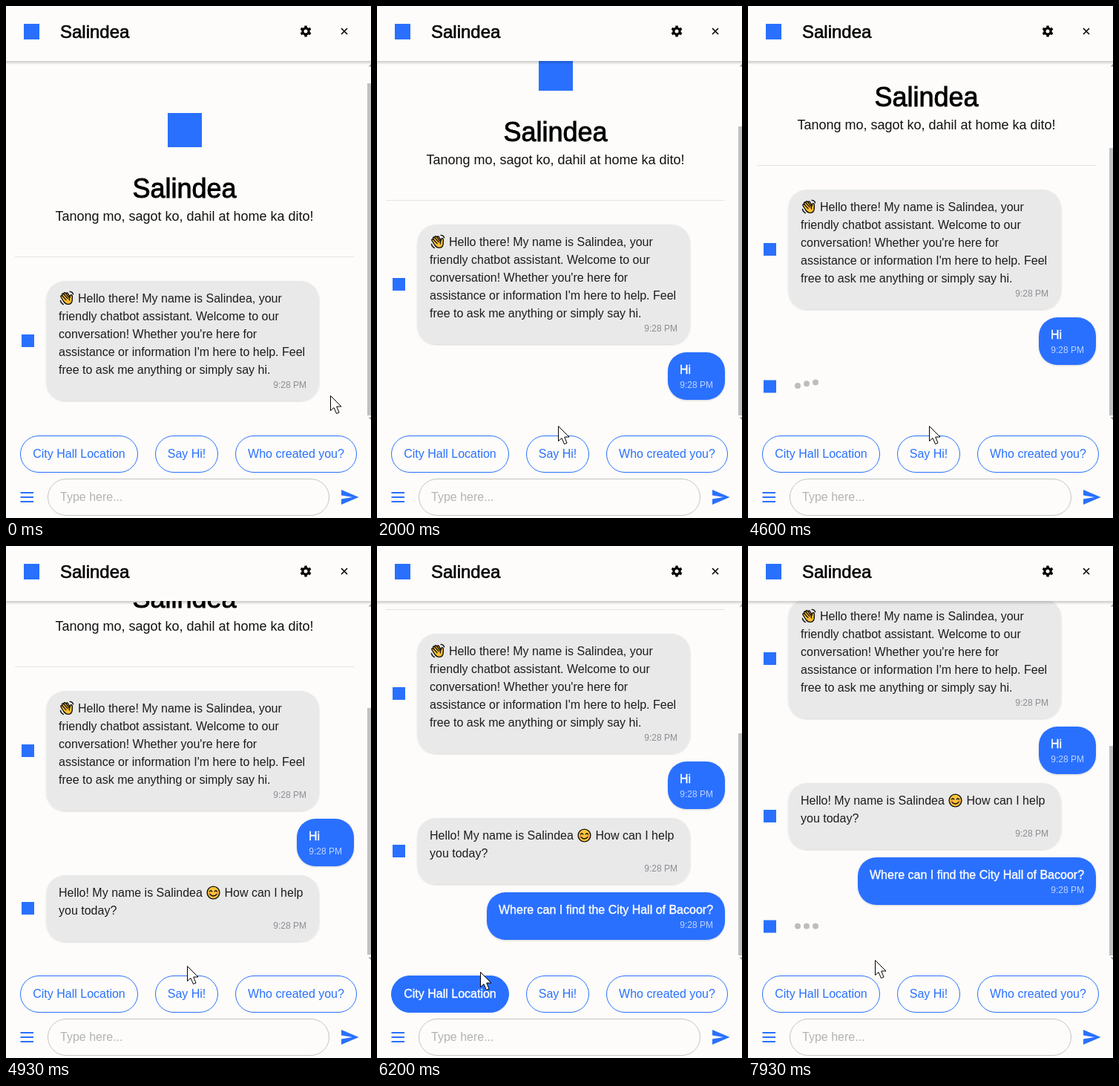
Animation, 492 px wide and 689 px high, one loop 8 s. Source, as an HTML page:

```html
<!DOCTYPE html>
<html lang="en">
<head>
<meta charset="utf-8">
<title>Chat assistant</title>
<style>
html, body { margin: 0; width: 100%; height: 100%; overflow: hidden; background: #fdfcfa; }
svg { display: block; width: 492px; height: 689px; font: 16px "Liberation Sans", Arial, sans-serif; }
.bold { stroke: currentColor; stroke-width: .35; }
.time { font-size: 12px; text-anchor: end; }
.mid { text-anchor: middle; }
.chip rect { fill: #fdfcfa; stroke: #2970ff; }
.chip text { fill: #2970ff; }
.chip.on rect { fill: #2970ff; }
.chip.on text { fill: #fff; stroke: #fff; stroke-width: .35; }
</style>
</head>
<body>
<svg viewBox="0 0 492 689">
  <defs>
    <clipPath id="view"><rect y="74" width="492" height="488"/></clipPath>
    <linearGradient id="shade" x2="0" y2="1">
      <stop stop-color="#000" stop-opacity=".2"/>
      <stop offset="1" stop-color="#000" stop-opacity="0"/>
    </linearGradient>
    <filter id="soft" x="-5%" y="-10%" width="110%" height="125%">
      <feDropShadow dx="0" dy="1" stdDeviation=".9" flood-opacity=".16"/>
    </filter>
    <g id="wave" stroke="#111" stroke-width="1.4" stroke-linejoin="round" stroke-linecap="round">
      <path fill="#ffbf2e" d="M2 8.5Q1.4 6.8 3 6.6L4 7Q2.8 4.6 4.6 4L6 4.8Q5.6 2.7 7.4 2.6L9 4.2Q9.6 2.4 11 3.2L14.2 8.6Q14.4 5.6 16 5.6 17.6 6 17.4 9.4L17.2 13.4Q16.4 18.4 11.8 18.4 8.4 18.2 6 15Z"/>
      <path fill="none" d="M4 7L9 12.6M6 4.8L11 10.6M9 4.2L12.4 9M14.2 8.6Q12.4 11 13.6 13M14 1.4Q17.6 1.6 18.6 4.8M1.4 13.4Q2.2 17.4 5.4 18.6"/>
    </g>
    <g id="smile" stroke="#111" stroke-width="1.4" stroke-linecap="round">
      <circle r="8.4" fill="#ffc53a"/>
      <g fill="#f08a4b" stroke="none"><circle cx="-5" cy="1.6" r="1.8"/><circle cx="5" cy="1.6" r="1.8"/></g>
      <path fill="none" d="M-5-1.6Q-3.4-4-1.8-1.6M1.8-1.6Q3.4-4 5-1.6M-4.2 2.6Q0 6.6 4.2 2.6"/>
    </g>
  </defs>

  <rect width="492" height="689" fill="#fdfcfa"/>
  <g clip-path="url(#view)">
    <g id="list">
      <rect x="218" y="144" width="46" height="46" fill="#2970ff"/>
      <text class="mid bold" x="240.5" y="258" font-size="36" style="stroke-width:.9">Salindea</text>
      <text class="mid" x="240.5" y="289" font-size="18" fill="#111">Tanong mo, sagot ko, dahil at home ka dito!</text>
      <path d="M12 337.5H469" stroke="#e4e4e7"/>
    </g>
    <path d="M488.5 81.5L492 78V81.5ZM488.5 553.5L492 557V553.5Z" fill="#a0a0a0"/>
    <rect id="thumb" x="487" width="5" fill="#c1c1c1"/>
  </g>

  <rect y="74" width="492" height="5" fill="url(#shade)"/>
  <rect width="492" height="74" fill="#fdfcfa"/>
  <rect x="24" y="24" width="21" height="21" fill="#2970ff"/>
  <text class="bold" x="73" y="43" font-size="24" style="stroke-width:.6">Salindea</text>
  <g transform="translate(404 34)">
    <circle r="4.1" fill="none" stroke="#000" stroke-width="3.2"/>
    <g id="teeth" stroke="#000" stroke-width="3.4"></g>
  </g>
  <path d="M452 30L460 38M460 30L452 38" stroke="#000" stroke-width="1.6"/>

  <g id="chips"></g>
  <path d="M19.500 655H37M19.500 661H37M19.500 667H37" stroke="#2970ff" stroke-width="2"/>
  <rect x="56.500" y="636.500" width="379" height="49" rx="24.500" fill="#fdfcfa" stroke="#c4c4c4"/>
  <text x="73" y="666" fill="#b3b3b3">Type here...</text>
  <path d="M452 651L475.500 661 452 671V663.500L467 661 452 658.500Z" fill="#2970ff"/>

  <g id="pointer" fill="#fff" stroke="#000" stroke-linejoin="round">
    <path id="arrow" d="M.5.5V20.500L5 16.500 8.500 24.500 12 23 8.700 15H15Z"/>
    <path id="hand" stroke-width="1.300" d="M0 2Q0-.5 2-.5T4 2V10Q7 8.500 8 11 10.500 9.800 11.500 12 14.500 11.500 14.500 14.500V19Q14 22 12 24.500V28.500H1.500V25.500Q-2.500 21.500-5-16.500
      M0 0"/>
  </g>
</svg>
<script>
const NS = 'http://www.w3.org/2000/svg', LOOP = 8000;
const BLUE = '#2970ff';
const $ = id => document.getElementById(id);

function add(parent, tag, attrs, text) {
  const el = document.createElementNS(NS, tag);
  for (const k in attrs) el.setAttribute(k, attrs[k]);
  if (text) el.textContent = text;
  return parent.appendChild(el);
}
const group = () => add($('list'), 'g', {});

function bubble(g, x, y, right, h, fill) {
  add(g, 'rect', { x, y, width: right - x, height: h, rx: 25, fill, filter: 'url(#soft)' });
}
function avatar(g, y) {
  add(g, 'rect', { x: 21, y: y - 8.5, width: 17, height: 17, fill: BLUE });
}
function botMessage(y, h, lines) {
  const g = group();
  avatar(g, y + h / 2);
  bubble(g, 54.5, y, 422, h, '#e9e9e9');
  for (const [x, row, text] of lines) add(g, 'text', { x, y: y + 29 + row * 24, fill: '#1c1c1c' }, text);
  add(g, 'text', { class: 'time', x: 405, y: y + h - 17, fill: '#8d8d95' }, '9:28 PM');
  return g;
}
function userMessage(x, y, text) {
  const g = group();
  bubble(g, x, y, 469, 64, BLUE);
  add(g, 'text', { class: 'bold', x: x + 16, y: y + 29, fill: '#fff', color: '#fff' }, text);
  add(g, 'text', { class: 'time', x: 453, y: y + 48, fill: '#bdd3ff' }, '9:28 PM');
  return g;
}
function typing(y) {
  const g = group();
  avatar(g, y);
  g.dots = [67, 79, 91].map(cx => add(g, 'circle', { cx, cy: y - .5, r: 4, fill: '#bdbdbd' }));
  return g;
}

const hello = botMessage(370, 161, [
  [97, 0, 'Hello there! My name is Salindea, your'],
  [71, 1, 'friendly chatbot assistant. Welcome to our'],
  [71, 2, "conversation! Whether you're here for"],
  [71, 3, "assistance or information I'm here to help. Feel"],
  [71, 4, 'free to ask me anything or simply say hi.']
]);
add(hello, 'use', { href: '#wave', x: 72, y: 383 });
const reply = botMessage(618, 89, [
  [71, 0, 'Hello! My name is Salindea'],
  [294.5, 0, 'How can I help'],
  [71, 1, 'you today?']
]);
add(reply, 'use', { href: '#smile', x: 279.5, y: 641.5 });

// [element, shown from, shown until]
const items = [
  [userMessage(392, 542, 'Hi'), 1518, LOOP],
  [typing(635), 3110, 4820],
  [reply, 4820, LOOP],
  [userMessage(148, 718, 'Where can I find the City Hall of Bacoor?'), 6040, LOOP],
  [typing(811), 7780, LOOP]
];

function chip(x, width, label, from, to) {
  const el = add($('chips'), 'g', { class: 'chip' });
  add(el, 'rect', { x: x + .5, y: 578.5, width: width - 1, height: 49, rx: 24.5 });
  add(el, 'text', { class: 'mid', x: x + width / 2, y: 608 }, label);
  return { el, from, to };
}
const chips = [
  chip(19, 159, 'City Hall Location', 5640, 6235),
  chip(201, 85, 'Say Hi!', 1180, 1640),
  chip(309, 164, 'Who created you?', -1, -1)
];

for (let a = 0; a < 360; a += 60) add($('teeth'), 'path', { d: 'M0-4V-7.500', transform: `rotate(${a})` });
$('hand').setAttribute('d', 'M0 2Q0-.5 2-.5T4 2V10Q7 8.500 8 11 10.500 9.800 11.500 12 14.500 11.500 14.500 14.500V19Q14 22 12 24.500V28.500H1.500V25.500Q-2.500 22-6 17-7.500 14-5.500 13.500-3.500 13.200 0 17Z');

const clamp = v => Math.max(0, Math.min(1, v));
const ease = v => v * v * (3 - 2 * v);

// [start, scroll position reached]
const scrolls = [[1520, 76], [3110, 123], [4820, 176], [6040, 252], [7780, 299]];
function scrollAt(t) {
  let pos = 0, end = 0;
  for (const [start, to] of scrolls) {
    if (t < start) break;
    const span = Math.sqrt(to - end) * 1000 / 60;
    pos = end + (to - end) * ease(clamp((t - start) / span));
    end = to;
  }
  return { pos: Math.round(pos), end };
}

// [time, x, y]
const path = [
  [0, 437, 524], [70, 437, 524], [330, 418, 503], [790, 418, 503], [1330, 248, 606], [1530, 248, 606],
  [1670, 246, 584], [2000, 244, 565], [5340, 244, 565], [5800, 118, 613], [6030, 120, 612],
  [6200, 139, 573], [6470, 142, 555], [6810, 142, 555], [7000, 149, 555], [7210, 149, 555],
  [7650, 171, 557], [LOOP, 171, 557]
];
function pointerAt(t) {
  const i = path.findIndex(p => p[0] > t), a = path[i - 1], b = path[i];
  const k = ease((t - a[0]) / (b[0] - a[0]));
  return [1, 2].map(n => Math.round(a[n] + (b[n] - a[n]) * k));
}

const show = (el, on) => el.setAttribute('visibility', on ? 'visible' : 'hidden');

function hop(t, i) {
  const k = (t % 870 - 170 - i * 100) / 500;
  return k > 0 && k < 1 ? -5 * Math.sin(Math.PI * k) ** 2 : 0;
}

function draw(t) {
  const { pos, end } = scrollAt(t), ratio = 467 / (510 + end);
  $('list').setAttribute('transform', `translate(0 ${-pos})`);
  $('thumb').setAttribute('y', Math.round(84 + (pos + 22) * ratio));
  $('thumb').setAttribute('height', Math.round(488 * ratio));

  for (const [el, from, to] of items) {
    show(el, t >= from && t < to);
    if (el.dots) el.dots.forEach((d, i) => d.setAttribute('transform', `translate(0 ${hop(Math.max(0, t - from), i)})`));
  }
  let over = false;
  for (const c of chips) {
    const on = t >= c.from && t < c.to;
    c.el.classList.toggle('on', on);
    over = over || on;
  }
  const [x, y] = pointerAt(t);
  const hand = over && y >= 578;
  $('pointer').setAttribute('transform', `translate(${x} ${y})`);
  show($('hand'), hand);
  show($('arrow'), !hand);
}

const begin = performance.now();
function tick() {
  draw((performance.now() - begin) % LOOP);
  requestAnimationFrame(tick);
}
draw(0);
requestAnimationFrame(tick);
</script>
</body>
</html>
```
